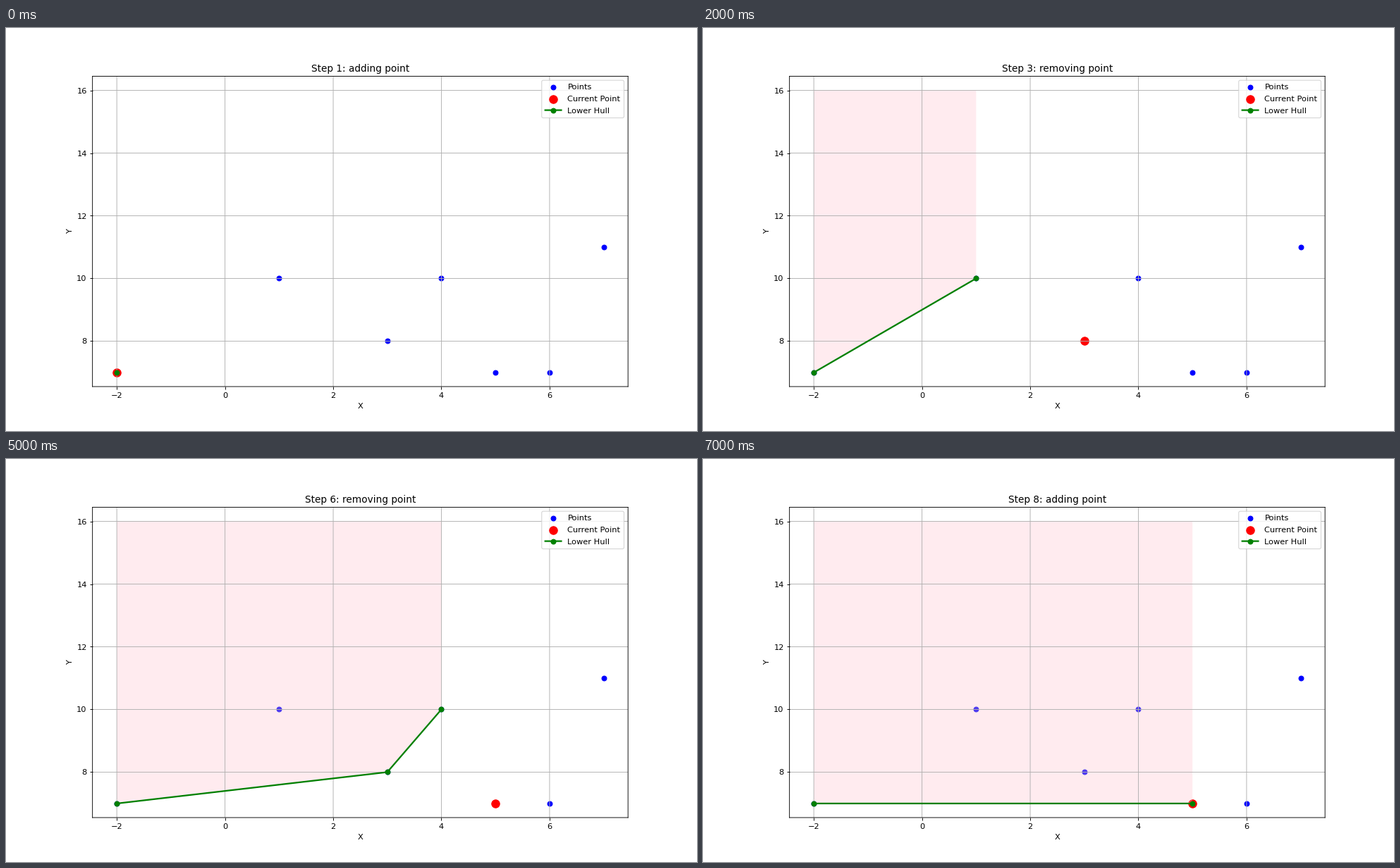
Write a matplotlib script that moves like this. It is 980 by 572 pixels and loops after 8000 ms.

```python
import matplotlib.pyplot as plt
from matplotlib.animation import FuncAnimation

WIDTH, HEIGHT = 980, 572
DPI = WIDTH / 12
STEPS = 8
TOP = 16
POINTS = [(-2, 7), (1, 10), (3, 8), (4, 10), (5, 7), (6, 7), (7, 11)]


def cross(o, a, b):
    return (a[0] - o[0]) * (b[1] - o[1]) - (a[1] - o[1]) * (b[0] - o[0])


def hull_steps(points):
    """List (action, current point, hull) for the lower monotone chain."""
    steps, hull = [], []
    for p in sorted(points):
        while len(hull) > 1 and cross(hull[-2], hull[-1], p) <= 0:
            steps.append(("removing", p, hull[:]))
            hull.pop()
        hull.append(p)
        steps.append(("adding", p, hull[:]))
    return steps


steps = hull_steps(POINTS)[:STEPS]

# Soft lines at their true positions instead of whole pixels.
plt.rcParams["path.snap"] = False

# The small surplus keeps the pixel size from rounding down.
fig, ax = plt.subplots(
    figsize=((WIDTH + 0.01) / DPI, (HEIGHT + 0.01) / DPI), dpi=DPI
)
fig.subplots_adjust(left=0.12515, right=0.90015, bottom=0.1102, top=0.8802)


def draw(i):
    action, current, hull = steps[i]
    hx, hy = zip(*hull)
    ax.clear()
    ax.scatter(*zip(*POINTS), color="blue", label="Points")
    ax.scatter(*current, color="red", s=100, label="Current Point")
    ax.plot(hx, hy, "o-", color="green", linewidth=2, label="Lower Hull")
    if len(hull) > 1:
        ax.fill([*hx, hx[-1], hx[0]], [*hy, TOP, TOP], "pink", alpha=0.3)
    ax.set_xlim(-2.45, 7.45)
    ax.set_ylim(6.55, 16.45)
    ax.set_title(f"Step {i + 1}: {action} point")
    ax.set_xlabel("X", labelpad=4.8)
    ax.set_ylabel("Y")
    ax.grid(True)
    ax.legend(loc="upper right", labelspacing=0.59, borderpad=0.44)
    return []


anim = FuncAnimation(
    fig, draw, frames=STEPS, init_func=lambda: [], interval=1000, repeat=True
)
plt.show()
```
